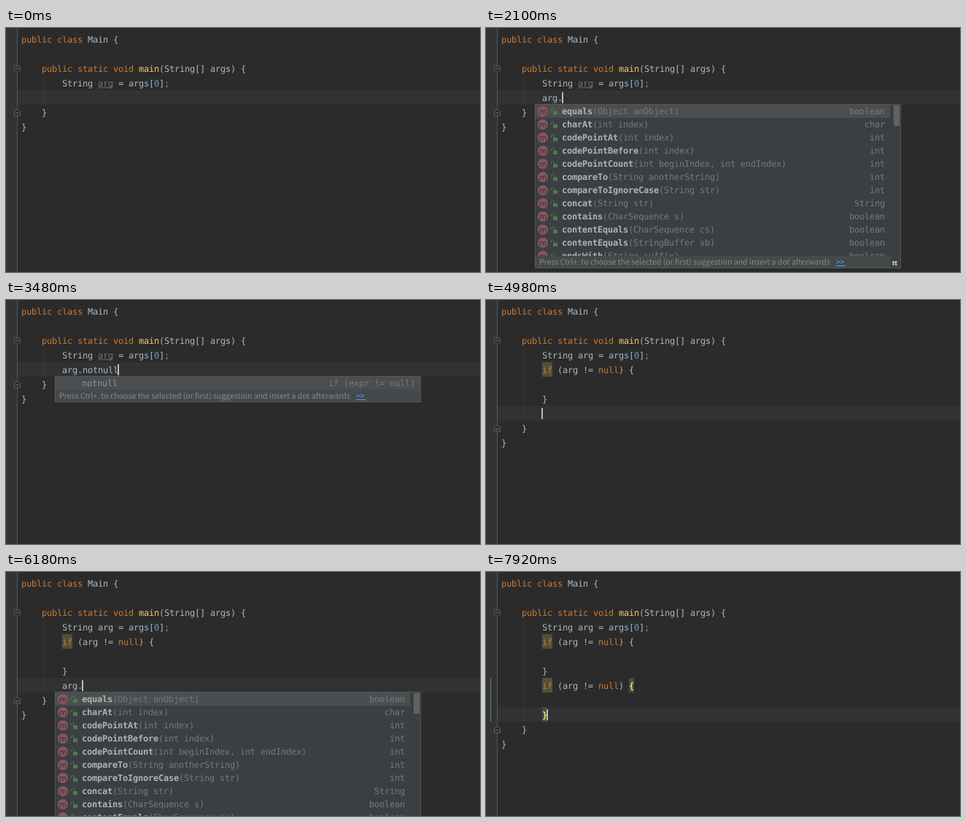
Recreate the animation shown at these times as an HTML page. Size 650 px wide and 334 px high, loop 8000 ms.

```html
<!DOCTYPE html>
<html lang="en">
<head>
<meta charset="utf-8">
<title>Postfix completion</title>
<style>
  html, body { margin: 0; width: 100%; height: 100%; overflow: hidden; background: #2b2b2b; }
  svg { display: block; width: 650px; height: 334px; }
  text { white-space: pre; text-rendering: geometricPrecision; }
  .mono { font: 12px "DejaVu Sans Mono", monospace; letter-spacing: -.224px; }
  .bold { font-weight: bold; }
  .hint { font: 10.55px "Noto Sans CJK SC", "Noto Sans CJK", "Noto Sans", sans-serif; }
  .icon { font: 10.5px "DejaVu Sans", sans-serif; text-anchor: middle; }
  .icon.bold { font-weight: bold; }
</style>
</head>
<body>
<svg id="stage" viewBox="0 0 650 334"></svg>
<script>
(() => {
const LOOP = 8000, CELL = 7, LINE = 20, ROW = 18;
const KEYWORDS = /^(public|class|static|void|if|null|;)$/;
const IF_LINE = '        if (arg != null) {', IF_END = '        }';

const method = (name, params, type) => ({ icon: 'm', name, params: `(${params})`, type });
const variable = (icon, name, type, prefix) => ({ icon, name, type, prefix });
const keyword = (name, prefix) => ({ name, prefix, type: '', bold: true });
const postfix = name => ({ name, type: 'if (expr != null)' });

const members = [
  method('equals', 'Object anObject', 'boolean'),
  method('charAt', 'int index', 'char'),
  method('codePointAt', 'int index', 'int'),
  method('codePointBefore', 'int index', 'int'),
  method('codePointCount', 'int beginIndex, int endIndex', 'int'),
  method('compareTo', 'String anotherString', 'int'),
  method('compareToIgnoreCase', 'String str', 'int'),
  method('concat', 'String str', 'String'),
  method('contains', 'CharSequence s', 'boolean'),
  method('contentEquals', 'CharSequence cs', 'boolean'),
  method('contentEquals', 'StringBuffer sb', 'boolean'),
  method('endsWith', 'String suffix', 'boolean')
];
const notifiers = [method('notify', '', 'void'), method('notifyAll', '', 'void')];
const withN = [...notifiers, postfix('nn'), postfix('notnull'),
  ...members.slice(2, 5), ...members.slice(7)];
const variables = prefix => [variable('v', 'arg', 'String', prefix), variable('p', 'args', 'String[]', prefix)];

const scopePopup = items => ({ x: 39, w: 433, items, hint: 'Press Ctrl+空格 to see non-imported classes', link: 265 });
const memberPopup = (items, long) => ({
  x: 67, w: 502, items, long, link: 480,
  hint: 'Press Ctrl+. to choose the selected (or first) suggestion and insert a dot afterwards'
});
const POPUPS = {
  a: scopePopup([...variables(1), keyword('assert', 1), keyword('abstract', 1)]),
  ar: scopePopup(variables(2)),
  arg: scopePopup(variables(3)),
  all: memberPopup(members, true),
  n: memberPopup(withN, true),
  not: memberPopup([...notifiers, postfix('notnull')]),
  notnull: memberPopup([postfix('notnull')]),
  nn: memberPopup([postfix('nn')])
};

// Each step changes part of the editor state.
const STEPS = [
  [0, { ifs: 0, warned: 0, used: false, typed: '', caret: false, row: 4, col: 8, braces: 0, popup: '' }],
  [600, { caret: true }],
  [1500, { typed: 'a' }],
  [1560, { popup: 'a' }],
  [1680, { typed: 'ar', popup: 'ar' }],
  [1740, { typed: 'arg' }],
  [1800, { popup: 'arg' }],
  [1980, { typed: 'arg.', popup: '' }],
  [2100, { popup: 'all' }],
  [2400, { typed: 'arg.n' }],
  [2460, { popup: 'n' }],
  [2640, { typed: 'arg.no' }],
  [2700, { popup: 'not' }],
  [2760, { typed: 'arg.not' }],
  [2940, { typed: 'arg.notn', popup: 'notnull' }],
  [3180, { typed: 'arg.notnu' }],
  [3360, { typed: 'arg.notnul' }],
  [3480, { typed: 'arg.notnull' }],
  [3720, { ifs: 1, typed: null, popup: '', row: 5, col: 12 }],
  [3840, { warned: 1, used: true }],
  [4500, { caret: false }],
  [4740, { caret: true, row: 6, col: 9, braces: 4 }],
  [4980, { typed: '', row: 7, col: 8, braces: 0 }],
  [5520, { typed: 'a' }],
  [5580, { popup: 'a' }],
  [5700, { typed: 'ar' }],
  [5760, { popup: 'ar' }],
  [5880, { typed: 'arg' }],
  [5940, { popup: 'arg' }],
  [6120, { typed: 'arg.', popup: '' }],
  [6180, { popup: 'all' }],
  [6780, { typed: 'arg.n' }],
  [6900, { typed: 'arg.nn', popup: 'nn' }],
  [7260, { ifs: 2, typed: null, popup: '', row: 8, col: 12 }],
  [7560, { warned: 2 }],
  [7920, { row: 9, col: 9, braces: 7 }]
];

const lineTop = row => 5 + row * LINE;
const colLeft = col => 21 + col * CELL;
const rect = (x, y, w, h, fill) => `<rect x="${x}" y="${y}" width="${w}" height="${h}" fill="${fill}"/>`;
const text = (x, y, s, fill, cls = 'mono') => `<text x="${x}" y="${y}" fill="${fill}" class="${cls}">${s.replace(/&/g, '&amp;').replace(/</g, '&lt;')}</text>`;
const path = (d, stroke, fill = 'none') => `<path d="${d}" stroke="${stroke}" fill="${fill}"/>`;

function tokenColor(token, row, used) {
  if (KEYWORDS.test(token)) return '#cc7832';
  if (token === 'main') return '#ffc66d';
  if (token === '0') return '#6897bb';
  if (token === 'arg' && row === 3 && !used) return '#72737a';
  return '#a9b7c6';
}

function codeLine(line, row, { braces, used }) {
  return [...line.matchAll(/\w+|;|[^\w\s;]+/g)].map(({ 0: token, index }) => {
    const x = colLeft(index), y = lineTop(row);
    const matched = braces && (row === braces && token === '{' || row === braces + 2);
    return matched
      ? rect(x, y, CELL, LINE, '#3b514d') + text(x, y + 15, token, '#ffef28', 'mono bold')
      : text(x, y + 15, token, tokenColor(token, row, used));
  }).join('');
}

function foldMark(y, dir) {
  const p = v => y + v * dir;
  return path(`M11.5 ${p(-4)}H19.5V${p(1.5)}L15.5 ${p(5)}L11.5 ${p(1.5)}Z`, '#606366', '#2b2b2b') +
    path(`M13.5 ${p(-.5)}H17.5`, '#7a7d80');
}

function itemIcon(icon, x, y) {
  if (!icon) return '';
  const isMethod = icon === 'm';
  const badge = `<circle cx="${x + 11}" cy="${y}" r="7" fill="${isMethod ? '#87565f' : '#8a6a3c'}"/>` +
    text(x + 11, y + 3.5, icon, '#352c2e', 'icon');
  const access = isMethod
    ? path(`M${x + 22.5} ${y}V${y - 2.5}Q${x + 24.5} ${y - 5} ${x + 26.5} ${y - 2.5}V${y}`, '#4f7a4c') +
      rect(x + 25, y, 6, 5, '#4f7a4c')
    : `<circle cx="${x + 27}" cy="${y}" r="2" fill="none" stroke="#8c8f91"/>`;
  return badge + access;
}

function popupItem(item, i, popup, y) {
  const { icon, name, params = '', type, prefix = 0, bold } = item;
  const x = popup.x + 37, base = y + 13;
  const right = popup.x + popup.w - (popup.long ? 22 : 8);
  const cls = icon === 'm' || bold ? 'mono bold' : 'mono';
  const end = x + name.length * CELL;
  return (i ? '' : rect(popup.x + 1, y, popup.w - (popup.long ? 16 : 2), ROW, '#4b4e50')) +
    itemIcon(icon, popup.x, y + 9) +
    (prefix ? text(x, base, name.slice(0, prefix), '#a266b8', cls) : '') +
    text(x + prefix * CELL, base, name.slice(prefix), icon || bold ? '#b0b2b3' : '#8f9293', cls) +
    text(end, base, params, '#77797b') +
    text(right - type.length * CELL, base, type, '#77797b');
}

function drawPopup(popup, y) {
  const { x, w, items, long, hint, link } = popup;
  const listHeight = long ? ROW * 11.5 : ROW * items.length;
  const foot = y + 1 + listHeight;
  return rect(x, y, w, listHeight + 18, '#555859') +
    rect(x + 1, y + 1, w - 2, listHeight, '#3c3f41') +
    items.map((item, i) => popupItem(item, i, popup, y + 1 + i * ROW)).join('') +
    (long ? rect(x + 492, y + 2, 8, 28, '#606263') : '') +
    rect(x + 1, foot, w - 2, 16, '#45494a') +
    text(x + 6, foot + 12.3, hint, '#87898a', 'hint') +
    text(link, foot + 12.3, '>>', '#589df6', 'hint') +
    rect(link, foot + 13, 13, 1, '#589df6') +
    (long ? rect(x + 487, foot, 14, 16, '#3c3f41') + text(x + 493.5, foot + 13, 'π', '#c4c4c4', 'icon bold') : '');
}

function draw(state) {
  const { ifs, warned, typed, row, braces, popup, caret } = state;
  const lines = ['public class Main {', '', '    public static void main(String[] args) {',
    '        String arg = args[0];'];
  for (let i = 0; i < ifs; i++) lines.push(IF_LINE, '', IF_END);
  if (typed !== null) lines.push('        ' + typed);
  const end = lines.push('    }', '}') - 2;
  const col = state.col + (typed || '').length;

  let out = rect(0, 0, 650, 334, '#2b2b2b') + rect(0, 0, 15, 334, '#313335') +
    rect(16, lineTop(row), 634, LINE, '#323232') + rect(15, 0, 1, 334, '#555555') +
    `<path d="M51.5 ${lineTop(3)}V${lineTop(end)}" stroke="#464646" stroke-dasharray="1 1"/>` +
    foldMark(56, 1) + foldMark(lineTop(end) + 11, -1);
  for (let i = 0; i < warned; i++) out += rect(77, lineTop(4 + 3 * i), 14, LINE, '#52503a');
  if (braces) out += rect(6, lineTop(braces), 1, 3 * LINE, '#5b8172');
  out += lines.map((line, i) => codeLine(line, i, state)).join('');
  if (!state.used) out += path('M126 82.5' + 'l2 -2l2 2'.repeat(5), '#77797c');
  if (caret) out += rect(colLeft(col) - 1, lineTop(row) + 3, 2, 15, '#bbbbbb');
  if (popup) out += drawPopup(POPUPS[popup], lineTop(row) + 19);
  return out;
}

const stage = document.getElementById('stage');
let shown = -1;

function render(time) {
  const passed = STEPS.filter(([start]) => start <= time);
  if (passed.length !== shown) {
    shown = passed.length;
    stage.innerHTML = draw(Object.assign({}, ...passed.map(([, change]) => change)));
  }
}

const begin = performance.now();
function tick() {
  render((performance.now() - begin) % LOOP);
  requestAnimationFrame(tick);
}
tick();
})();
</script>
</body>
</html>
```
